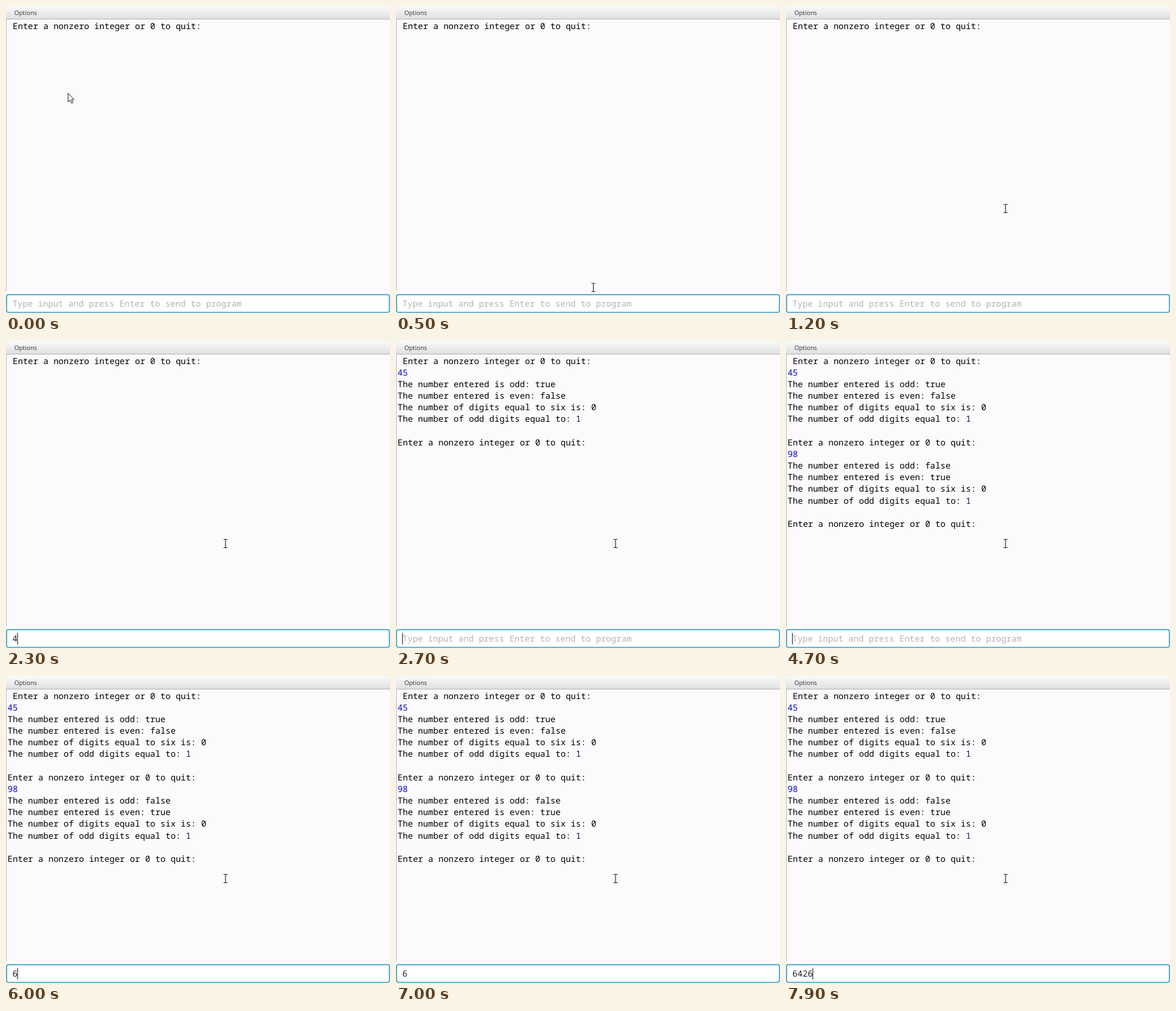
An HTML page that plays this animation: 600x479 px, repeating every 8 s.

```html
<!DOCTYPE html>
<html lang="en">
<head>
<meta charset="utf-8">
<title>Console</title>
<style>
  html, body { margin: 0; width: 100%; height: 100%; overflow: hidden; background: #fcfafd; }
  svg { display: block; width: 600px; height: 479px; }
  text {
    font: 13.27px "Roboto Mono", "Noto Sans Mono", monospace;
    white-space: pre;
    text-rendering: geometricPrecision;
  }
  #menu { font: 9.6px "Open Sans", "Noto Sans", sans-serif; fill: #333; }
  .entry { fill: #0a06c4; }
  .count { fill: #14145a; }
</style>
</head>
<body>
<svg viewBox="0 0 600 479">
  <defs>
    <linearGradient id="bar" x2="0" y2="1">
      <stop stop-color="#fafafa"/>
      <stop offset="1" stop-color="#e1e0e1"/>
    </linearGradient>
  </defs>
  <rect width="600" height="479" fill="#fcfafd"/>
  <rect width="600" height="20" fill="url(#bar)"/>
  <rect y="20" width="600" height="1" fill="#b7b6b8"/>
  <rect y="21" width="1" height="424" fill="#bcbbbd"/>
  <text id="menu" x="13" y="14">Options</text>
  <g id="log"></g>
  <rect y="445" width="600" height="34" fill="#fff"/>
  <rect x=".9" y="450.4" width="598.2" height="27.6" rx="3" fill="#fff" stroke="#41a0c4" stroke-width="1.6"/>
  <text id="field" x="10" y="469"></text>
  <rect id="caret" y="455.5" width="1.2" height="18" fill="#333"/>
  <path id="arrow" d="M0 0V13.6L3.1 10.8L5.4 15.8L7.6 14.8L5.4 10H9.4Z" fill="#fff" stroke="#222" stroke-width="1" stroke-linejoin="round"/>
  <path id="beam" d="M-3 -6.5H-.8L0 -5.9L.8 -6.5H3M0 -6V6M-3 6.5H-.8L0 5.9L.8 6.5H3" fill="none" stroke="#222" stroke-width="1.1"/>
</svg>
<script>
const LOOP = 8000, BLINK = 200, CHAR = 7.963, LINE = 18.17;
const $ = id => document.getElementById(id);

const prompt = "Enter a nonzero integer or 0 to quit:";
const report = (n, odd) => [
  `<tspan class="entry">${n}</tspan>`,
  `The number entered is odd: ${odd}`,
  `The number entered is even: ${!odd}`,
  "The number of digits equal to six is: 0",
  'The number of odd digits equal to: <tspan class="count">1</tspan>',
  "",
  prompt
];
const lines = [" " + prompt, ...report(45, true), ...report(98, false)];
$("log").innerHTML = lines.map((s, i) =>
  `<text x="2.5" y="${35.5 + i * LINE}">${s}</text>`).join("");
const rows = [...$("log").children];

// [time, field content, visible log lines]; each event restarts the caret blink
const events = [
  [600, "", 1],
  [2200, "4", 1], [2400, "45", 1], [2700, "", 8],
  [4200, "9", 8], [4600, "98", 8], [4700, "", 15],
  [6000, "6", 15], [7200, "64", 15], [7800, "642", 15], [7900, "6426", 15]
];
const pointer = [[0, 97, 136], [600, 325, 463], [950, 343, 316]];

function pointerAt(t) {
  const i = pointer.findIndex(p => p[0] > t);
  if (i < 0) return pointer.at(-1).slice(1);
  const [a, b] = [pointer[i - 1], pointer[i]];
  const u = (t - a[0]) / (b[0] - a[0]), e = u * u * (3 - 2 * u);
  return [1, 2].map(k => a[k] + (b[k] - a[k]) * e);
}

const show = (el, on) => el.setAttribute("visibility", on ? "visible" : "hidden");

function draw(now) {
  const t = now % LOOP;
  const last = events.findLast(e => e[0] <= t);
  const [since, typed, count] = last || [0, "", 1];

  rows.forEach((row, i) => show(row, i < count));
  const field = $("field");
  const content = typed || "Type input and press Enter to send to program";
  if (field.textContent !== content) field.textContent = content;
  field.setAttribute("fill", typed ? "#222" : "#b4b2b5");

  $("caret").setAttribute("x", 9.5 + typed.length * CHAR);
  show($("caret"), last && Math.floor((t - since) / BLINK) % 2 === 0);

  const moving = t >= 100;
  const move = `translate(${pointerAt(t)})`;
  for (const id of ["arrow", "beam"]) $(id).setAttribute("transform", move);
  show($("arrow"), !moving);
  show($("beam"), moving);
}

const start = performance.now();
function tick() {
  draw(performance.now() - start);
  requestAnimationFrame(tick);
}
tick();
</script>
</body>
</html>
```
